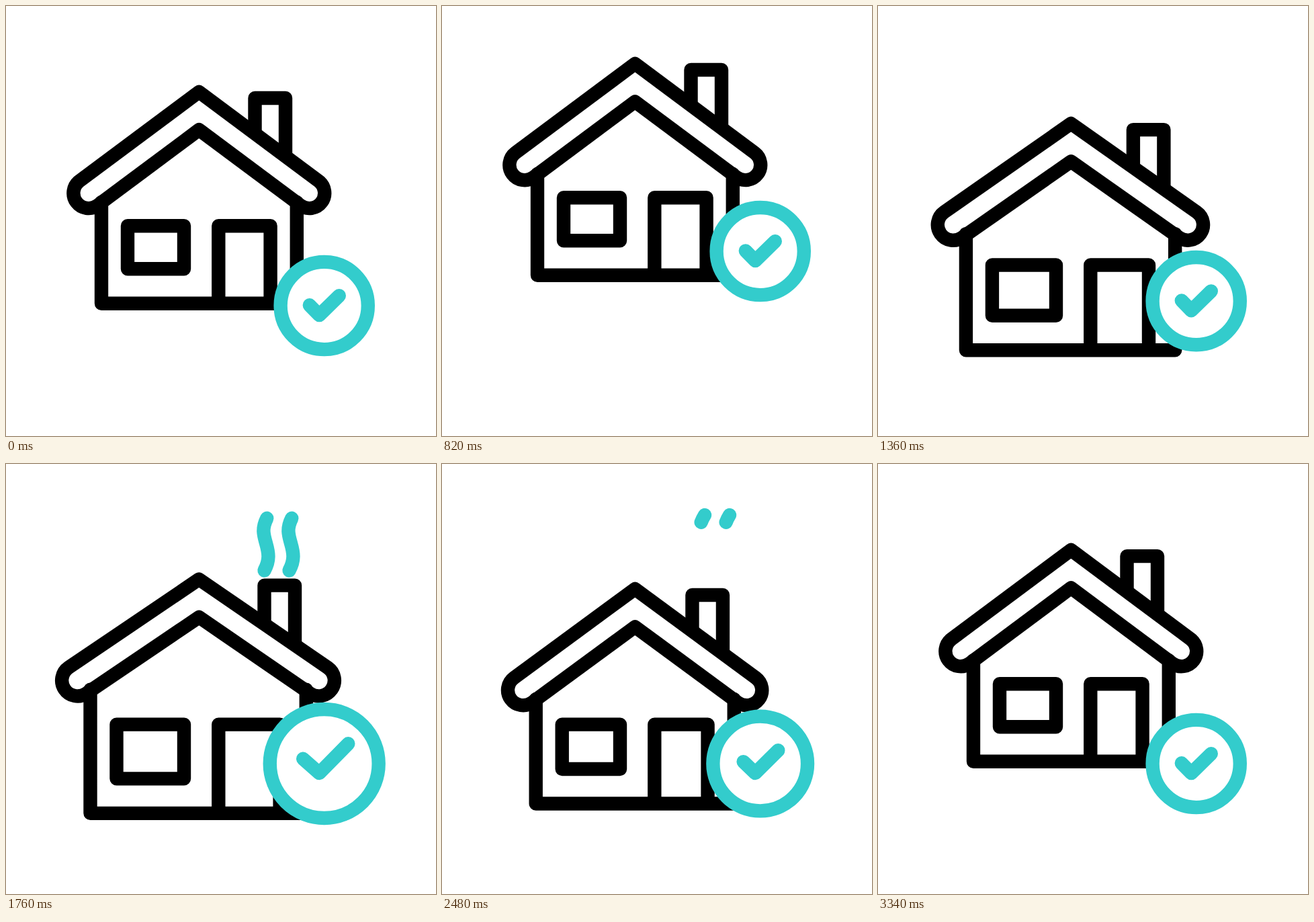
These frames come from a looping animation (640x640 px, 3600 ms). An HTML page:

```html
<!DOCTYPE html>
<html lang="en">
<head>
<meta charset="utf-8">
<title>House approved</title>
<style>
  html, body { margin: 0; width: 100%; height: 100%; overflow: hidden; background: #fff; }
  svg { display: block; width: 100vw; height: 100vh; }
  path, circle { fill: none; stroke: #000; stroke-width: 20.4; stroke-linecap: round; stroke-linejoin: round; }
  .accent { stroke: #3cc; }
  #roof, #ring { fill: #fff; }
</style>
</head>
<body>
<svg viewBox="0 0 640 640">
  <g id="smoke">
    <path class="accent" pathLength="1" d="M384.5 158.5C393 143 391 132 387 118S380 94 391 76"/>
    <path class="accent" pathLength="1" d="M384.5 158.5C393 143 391 132 387 118S380 94 391 76" transform="translate(37)"/>
  </g>
  <path id="chimney"/>
  <path id="roof"/>
  <path id="body"/>
  <circle id="ring" class="accent" cx="473.7"/>
  <path id="tick" class="accent"/>
</svg>
<script>
const LOOP = 3600;
const el = id => document.getElementById(id);
const [smoke, chimney, roof, body, ring, tick] =
  ['smoke', 'chimney', 'roof', 'body', 'ring', 'tick'].map(el);

const clamp = u => Math.min(1, Math.max(0, u));
const smooth = u => u * u * (3 - 2 * u);

// cubic-bezier(.33, 0, .1, 1)
function ease(x) {
  let lo = 0, hi = 1;
  for (let i = 0; i < 24; i++) {
    const s = (lo + hi) / 2, r = 1 - s;
    if (.99 * r * r * s + .3 * r * s * s + s * s * s < x) lo = s; else hi = s;
  }
  return smooth((lo + hi) / 2);
}

const ramp = (t, from, to, curve = ease) => curve(clamp((t - from) / (to - from)));

function drawHouse(y, k) {
  const top = y - 16.75 * k, base = 442.7 + y + 16.75 * k;
  const left = x => x - 16.5 * k, right = x => x + 14 * k;

  const cx = 287.3, mid = 156.1 + top, half = 28.2, endY = 278.5 + top;
  const eave = ex => {
    const a = Math.atan2(endY - mid, Math.abs(cx - ex)), r = half * Math.cos(a);
    return { ex, r, dx: r * Math.sin(a) * Math.sign(ex - cx), dy: r * Math.cos(a) };
  };
  const l = eave(left(123)), r = eave(right(451.6));
  roof.setAttribute('d',
    `M${cx} ${mid - half}L${r.ex + r.dx} ${endY - r.dy}` +
    `A${r.r} ${r.r} 0 0 1 ${r.ex - r.dx} ${endY + r.dy}` +
    `L${cx} ${mid + half}L${l.ex - l.dx} ${endY + l.dy}` +
    `A${l.r} ${l.r} 0 0 1 ${l.ex + l.dx} ${endY - l.dy}Z`);

  chimney.setAttribute('d',
    `M${right(370.5)} ${191 + top}V${137 + top}H${right(416)}V${224 + top}`);

  const sill = base - 51.5, lintel = 327.2 + y;
  body.setAttribute('d',
    `M${left(142)} ${292 + top}V${base}H${right(432.8)}V${292 + top}` +
    `M${left(181)} ${lintel}H265V${sill}H${left(181)}Z` +
    `M316.3 ${base}V${lintel}H${right(393.6)}V${base}`);
}

function drawBadge(y, g) {
  ring.setAttribute('cy', 446 + y);
  ring.setAttribute('r', 65.1 + 17 * g);
  tick.setAttribute('d',
    `M${451.8 - 10.3 * g} ${445.3 + y - 7 * g}L466.3 ${460.1 + y}` +
    `L${495.8 + 14.5 * g} ${431.2 + y - 16 * g}`);
}

function drawSmoke(from, to) {
  const visible = to > from + .002;
  smoke.setAttribute('visibility', visible ? 'visible' : 'hidden');
  if (!visible) return;
  smoke.setAttribute('stroke-dasharray', `${to - from} 2`);
  smoke.setAttribute('stroke-dashoffset', -from);
}

function frame(now) {
  const t = now % LOOP;
  const rise = ramp(t, 200, 845);
  const settle = ramp(t, 2045, 2866);

  drawHouse(
    -42 * rise + 102.4 * ramp(t, 825, 1500) - 60.4 * ramp(t, 2805, 3380),
    ramp(t, 930, 1630, smooth) - settle);
  drawBadge(
    81 * (ramp(t, 850, 1680) - rise),
    ramp(t, 1358, 1978) - ramp(t, 2245, 2866));
  drawSmoke(settle, ramp(t, 1350, 1970));
  requestAnimationFrame(() => frame(performance.now()));
}
frame(performance.now());
</script>
</body>
</html>
```
